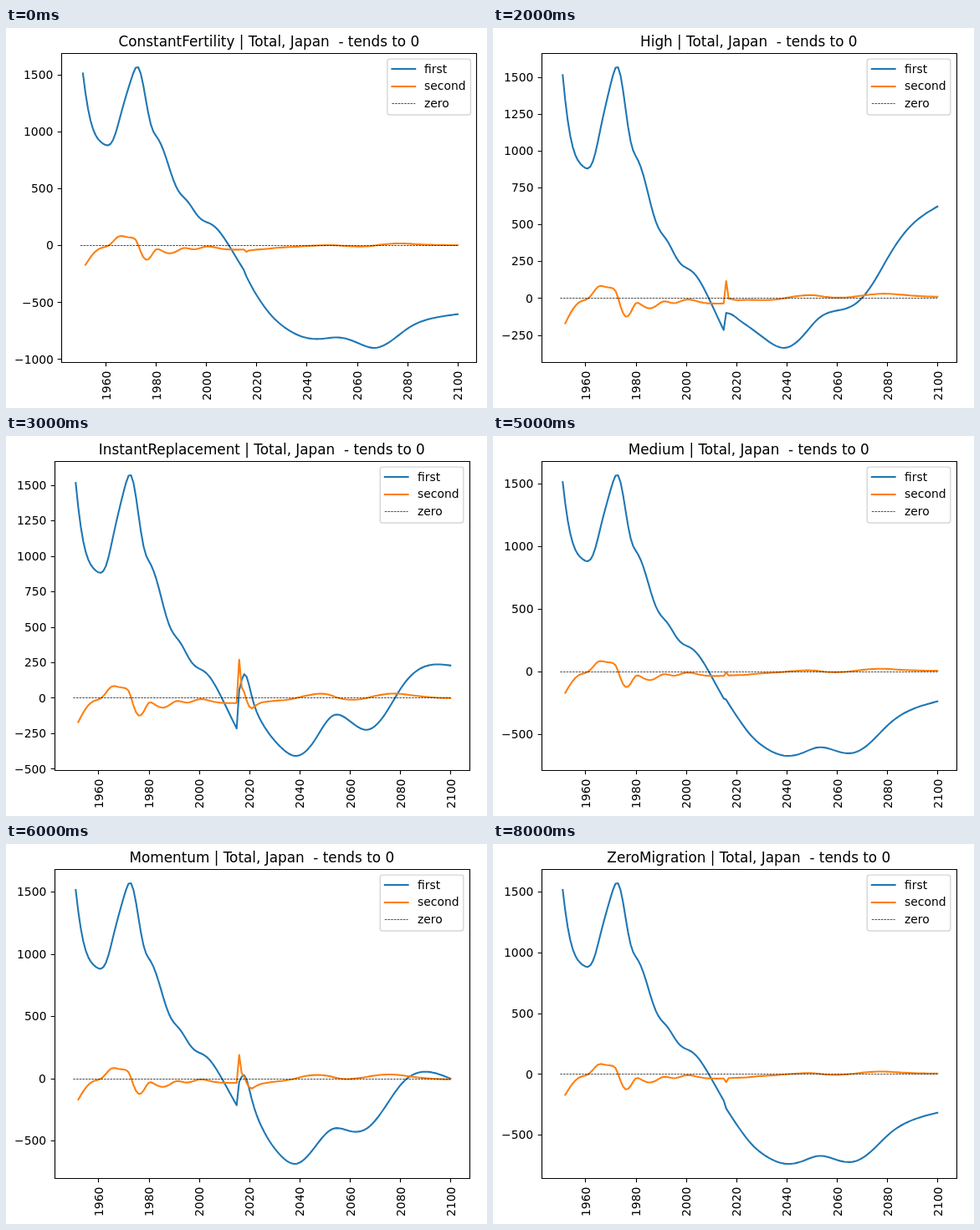
Write an HTML page that moves like this. It is 575 px wide and 455 px high and loops after 9000 ms.

```html
<!DOCTYPE html>
<html lang="en">
<head>
<meta charset="utf-8">
<title>Population change by scenario</title>
<style>
  html, body { margin: 0; width: 100%; height: 100%; overflow: hidden; background: #fff; }
  svg { display: block; }
  text { font-family: "DejaVu Sans", sans-serif; font-size: 13.889px; fill: #000; white-space: pre; }
  .title { font-size: 16.83px; text-anchor: middle; }
  .axis { fill: none; stroke: #000; stroke-width: 1.11; }
  .first, .second { fill: none; stroke-width: 2.083; stroke-linejoin: round; stroke-linecap: square; }
  .first { stroke: #1f77b4; }
  .second { stroke: #ff7f0e; }
  .zero { fill: none; stroke: #000; stroke-width: 0.694; stroke-dasharray: 2.57 1.11; }
  .box { fill: #fff; fill-opacity: 0.8; stroke: #ccc; stroke-opacity: 0.8; stroke-width: 1.389; }
</style>
</head>
<body>
<svg id="stage" width="575" height="455" viewBox="0 0 575 455"></svg>
<script>
const STEP_MS = 1000;
const WIDTH = 496, HEIGHT = 369.6, TOP = 30.2, BOTTOM = TOP + HEIGHT;
const TICK = 4.86, LABEL_GAP = 9.72, DIGIT = 8.84;

// Natural cubic spline through [x, y] knots.
function spline(knots) {
  const n = knots.length - 1;
  const gap = i => knots[i + 1][0] - knots[i][0];
  const slope = i => (knots[i + 1][1] - knots[i][1]) / gap(i);
  const c = [0], d = [0], m = Array(n + 1).fill(0);
  for (let i = 1; i < n; i++) {
    const pivot = 2 * (gap(i - 1) + gap(i)) - gap(i - 1) * c[i - 1];
    c[i] = gap(i) / pivot;
    d[i] = (6 * (slope(i) - slope(i - 1)) - gap(i - 1) * d[i - 1]) / pivot;
  }
  for (let i = n - 1; i > 0; i--) m[i] = d[i] - c[i] * m[i + 1];
  return x => {
    let i = 0;
    while (i < n - 1 && x > knots[i + 1][0]) i++;
    const h = gap(i), a = (knots[i + 1][0] - x) / h, b = 1 - a;
    return a * knots[i][1] + b * knots[i + 1][1] +
      ((a ** 3 - a) * m[i] + (b ** 3 - b) * m[i + 1]) * h * h / 6;
  };
}

// The shared past is summed from its yearly change.
const pastChange = spline([
  [1952, -171], [1955, -76], [1958, -24], [1961, -3], [1963, 35], [1965, 77], [1968, 76],
  [1971, 66], [1972, 50], [1974, -56], [1976, -125], [1978, -98], [1980, -36], [1982, -42],
  [1986, -69], [1988, -54], [1991, -23], [1995, -34], [2000, -10], [2005, -24], [2015, -36]
]);
const past = [[1951, 1514]];
for (let year = 1952; year < 2016; year++) past.push([year, past.at(-1)[1] + pastChange(year)]);

// Key years: three early ones, then every seventh year, then the end.
const keyYears = [2016, 2018, 2021, ...Array.from({ length: 10 }, (_, i) => 2025 + 7 * i), 2100];
const outlook = (...values) => spline(values.map((v, i) => [keyYears[i], v]));
const progress = year => (year - 2016) / 84;

const fertility = outlook(-272, -358, -469, -592, -733, -808, -821, -810, -855, -901, -833, -718, -652, -605);
const mortality = outlook(-283, -383, -513, -660, -812, -866, -818, -791, -804, -750, -608, -476, -406, -348);
const replacement = outlook(52, 167, 11, -173, -338, -409, -300, -128, -164, -225, -115, 85, 206, 228);
const lowBirths = outlook(-352, -468, -606, -764, -902, -945, -952, -950, -1020, -1048, -965, -845, -776, -706);
const momentum = outlook(-29, 25, -167, -393, -610, -686, -556, -408, -424, -400, -232, -35, 49, -2);
const closed = outlook(-282, -347, -439, -550, -676, -735, -718, -672, -705, -718, -628, -489, -396, -318);
const medium = year => closed(year) + 56 + 22 * progress(year);
const highBirths = year => medium(year) + (medium(year) - lowBirths(year)) * (1 + 0.85 * progress(year));
const noChange = year => fertility(year) + mortality(year) - medium(year);

const scenarios = [
  ['ConstantFertility', fertility],
  ['ConstantMortality', mortality],
  ['High', highBirths],
  ['InstantReplacement', replacement],
  ['Low', lowBirths],
  ['Medium', medium],
  ['Momentum', momentum],
  ['NoChange', noChange],
  ['ZeroMigration', closed]
];

const snap = v => Math.round(v) + 0.5;
const path = (cls, d) => `<path class="${cls}" d="${d}"/>`;
const label = (x, y, s, attrs = '') => `<text x="${x}" y="${y}" ${attrs}>${s}</text>`;

function legend(right) {
  const w = 99.6, x = right - 6.94 - w, y = TOP + 6.94;
  const rows = ['first', 'second', 'zero'].map((name, i) => {
    const mid = y + 11.6 + i * 20.87;
    const lineY = Math.round(mid) + (name === 'zero' ? 0.5 : 0);
    return path(name, `M${x + 5.56} ${lineY}h27.78`) +
      label(Math.round(x + 44.45), Math.round(mid + 4.86), name);
  });
  return `<rect class="box" x="${x}" y="${y}" width="${w}" height="66.8" rx="2.78"/>` + rows.join('');
}

function chart([name, future]) {
  const first = [...past];
  for (let year = 2016; year <= 2100; year++) first.push([year, future(year)]);
  const second = first.slice(1).map(([year, v], i) => [year, v - first[i][1]]);

  const values = first.map(p => p[1]);
  const min = Math.min(...values), max = Math.max(...values);
  const pad = (max - min) * 0.05, low = min - pad, high = max + pad;
  const left = low < -1000 ? 66.4 : 57.8;
  const px = year => left + (year - 1942.5) * WIDTH / 165;
  const py = v => TOP + (high - v) * HEIGHT / (high - low);
  const line = points => 'M' + points.map(([t, v]) => px(t).toFixed(2) + ' ' + py(v).toFixed(2)).join('L');

  const x0 = snap(left), x1 = x0 + WIDTH, y0 = snap(TOP), y1 = snap(BOTTOM);
  let ticks = '', labels = '';
  for (let year = 1960; year <= 2100; year += 20) {
    ticks += `M${snap(px(year))} ${y1}v${TICK}`;
    labels += label(0, 0, year, `transform="translate(${Math.round(px(year) + 5.5)} 446) rotate(-90)"`);
  }
  const step = (high - low) / 9 > 250 ? 500 : 250;
  for (let v = Math.ceil(low / step) * step; v <= high; v += step) {
    const digits = String(Math.abs(v));
    const width = digits.length * DIGIT + (v < 0 ? 11.64 : 0);
    ticks += `M${x0} ${snap(py(v))}h${-TICK}`;
    labels += label(Math.round(left - LABEL_GAP - width), Math.round(py(v) + 5.1),
      (v < 0 ? '\u2212' : '') + digits);
  }

  return path('axis', ticks) + labels +
    path('first', line(first)) + path('second', line(second)) +
    path('zero', `M${px(1950)} ${snap(py(0))}H${px(2100)}`) +
    path('axis', `M${x0} ${y0}H${x1}V${y1}H${x0}Z`) +
    label(left + WIDTH / 2, 22, `${name} | Total, Japan  - tends to 0`, 'class="title"') +
    legend(left + WIDTH);
}

const stage = document.getElementById('stage');
stage.innerHTML = scenarios.map(s => `<g visibility="hidden">${chart(s)}</g>`).join('');
const slides = [...stage.children];
const start = performance.now();
let shown = -1;

function show(now) {
  const index = Math.floor(Math.max(0, now - start) / STEP_MS) % slides.length;
  if (index !== shown) {
    slides.forEach((g, i) => g.setAttribute('visibility', i === index ? 'visible' : 'hidden'));
    shown = index;
  }
  requestAnimationFrame(show);
}
show(start);
</script>
</body>
</html>
```
